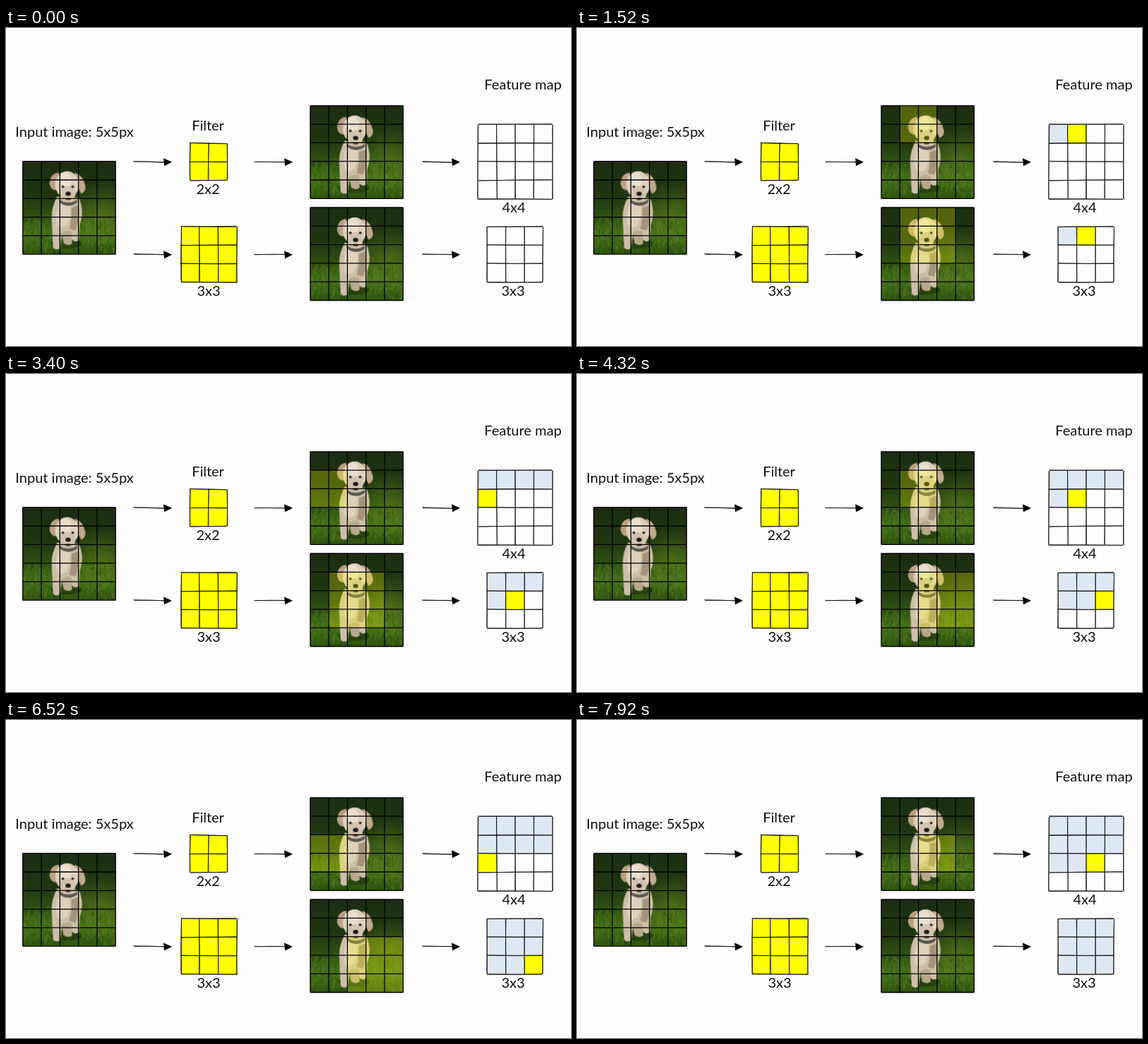
An HTML page with a canvas that plays this animation: 800x450 px, repeating every 8000 ms.

```html
<!DOCTYPE html>
<html lang="en">
<head>
<meta charset="utf-8">
<title>Filter size and feature map</title>
<style>
  html, body { margin: 0; height: 100%; overflow: hidden; background: #fffeff; }
  canvas { display: block; }
</style>
</head>
<body>
<canvas id="stage" width="800" height="450"></canvas>
<script>
const LOOP = 8000, FIRST_STEP = 650, STEP = 2000 / 3;
const CELL = 26.3, PHOTO = 131.5;
const YELLOW = '#ffff00', BLUE = '#dee8f4', INK = '#111';
const ctx = document.getElementById('stage').getContext('2d');

let seed = 1;
const rand = () => (seed = seed * 16807 % 2147483647) / 2147483647;
const jitter = amount => (rand() * 2 - 1) * amount;

function shape(c, color, path) {
  c.fillStyle = color;
  c.fill(new Path2D(path));
}

function oval(c, color, x, y, rx, ry, angle = 0) {
  c.fillStyle = color;
  c.beginPath();
  c.ellipse(x, y, rx, ry, angle, 0, 7);
  c.fill();
}

// Simplified puppy on a lawn, painted once
function paintPhoto() {
  const canvas = document.createElement('canvas');
  canvas.width = canvas.height = 132;
  const c = canvas.getContext('2d');
  const lawn = c.createLinearGradient(0, 0, 0, 132);
  [[0, '#1b2f10'], [.35, '#1f3611'], [.6, '#2f5213'], [.78, '#467319'], [1, '#2f5412']]
    .forEach(([at, color]) => lawn.addColorStop(at, color));
  c.fillStyle = lawn;
  c.fillRect(0, 0, 132, 132);
  const glow = c.createRadialGradient(112, 76, 4, 112, 76, 50);
  glow.addColorStop(0, 'rgba(110,140,35,.45)');
  glow.addColorStop(1, 'rgba(110,140,35,0)');
  c.fillStyle = glow;
  c.fillRect(0, 0, 132, 132);

  seed = 11;
  for (let i = 0; i < 260; i++) {
    const x = rand() * 132, y = 80 + rand() * 52;
    c.strokeStyle = rand() < .5 ? 'rgba(125,165,50,.35)' : 'rgba(22,48,8,.4)';
    c.beginPath();
    c.moveTo(x, y);
    c.lineTo(x + jitter(3), y - 3 - rand() * 5);
    c.stroke();
  }

  oval(c, 'rgba(20,40,8,.5)', 62, 117, 22, 7);
  shape(c, '#b8a88d', 'M54 95 L70 95 70 117 Q64 121 58 116Z');
  shape(c, '#cdbea6', 'M49 50 Q41 64 41 80 L43 121 Q44 127 53 124 L56 101 Q63 96 69 100 L70 111 Q74 116 80 112 L81 90 Q88 72 80 52Z');
  shape(c, '#ded0ba', 'M52 57 Q45 74 49 92 Q56 97 63 90 Q69 76 67 60Z');
  shape(c, '#a49379', 'M69 66 Q70 82 66 96 L75 98 Q82 82 79 62Z');
  shape(c, '#5a5650', 'M52 54 Q64 63 78 54 L77 59 Q65 67 53 59Z');
  shape(c, '#baa184', 'M51 16 Q39 17 38 32 Q40 41 47 41 L52 26Z');
  shape(c, '#c2a98a', 'M74 16 Q86 20 89 35 Q90 43 83 46 L76 32Z');
  oval(c, '#ddd0bb', 63, 33, 17, 19);
  oval(c, '#e9dfcf', 60, 27, 9, 11);
  oval(c, '#d2c3ac', 64, 46, 11, 11);
  oval(c, '#25201b', 57, 36, 2, 1.8);
  oval(c, '#25201b', 71, 36, 2, 1.8);
  oval(c, '#1d1a18', 64.5, 46, 3.8, 3);
  oval(c, '#54463c', 64.5, 53.5, 4, 1.8);
  return canvas;
}
const photo = paintPhoto();

function roughLine(x1, y1, x2, y2) {
  ctx.strokeStyle = INK;
  ctx.lineWidth = .85;
  for (let pass = 0; pass < 2; pass++) {
    ctx.beginPath();
    ctx.moveTo(x1 + jitter(.8), y1 + jitter(.8));
    ctx.quadraticCurveTo((x1 + x2) / 2 + jitter(.8), (y1 + y2) / 2 + jitter(.8),
      x2 + jitter(.8), y2 + jitter(.8));
    ctx.stroke();
  }
}

function grid(x, y, n) {
  const size = n * CELL;
  for (let i = 0; i <= n; i++) {
    roughLine(x, y + i * CELL, x + size, y + i * CELL);
    roughLine(x + i * CELL, y, x + i * CELL, y + size);
  }
}

function filterGrid(x, y, n) {
  ctx.fillStyle = YELLOW;
  ctx.fillRect(x, y, n * CELL, n * CELL);
  grid(x, y, n);
}

// n is the feature map side; the window covers 6 - n cells
function picture(x, y, n, step = -1) {
  ctx.drawImage(photo, x, y, PHOTO, PHOTO);
  if (step >= 0 && step < n * n) {
    const side = (6 - n) * CELL;
    ctx.fillStyle = 'rgba(255,255,0,.25)';
    ctx.fillRect(x + step % n * CELL, y + Math.floor(step / n) * CELL, side, side);
  }
  ctx.strokeStyle = '#000';
  ctx.lineWidth = 1.3;
  ctx.beginPath();
  for (let i = 0; i <= 5; i++) {
    const d = i * CELL;
    ctx.moveTo(x, y + d);
    ctx.lineTo(x + PHOTO, y + d);
    ctx.moveTo(x + d, y);
    ctx.lineTo(x + d, y + PHOTO);
  }
  ctx.stroke();
}

function featureMap(x, y, n, step) {
  for (let i = 0; i <= Math.min(step, n * n - 1); i++) {
    ctx.fillStyle = i === step ? YELLOW : BLUE;
    ctx.fillRect(x + i % n * CELL, y + Math.floor(i / n) * CELL, CELL, CELL);
  }
  grid(x, y, n);
}

function arrow(x, y) {
  roughLine(x, y, x + 46, y + .8);
  shape(ctx, '#000', `M${x + 54} ${y + .8} l-12 -5.5 l1 11Z`);
}

function label(text, x, y) {
  ctx.fillStyle = INK;
  ctx.fillText(text, x, y);
}

function draw(now) {
  const step = Math.floor((now % LOOP - FIRST_STEP) / STEP);
  seed = 77;
  ctx.fillStyle = '#fffeff';
  ctx.fillRect(0, 0, 800, 450);

  picture(23.7, 188.7, 4);
  filterGrid(260.5, 163, 2);
  filterGrid(247.8, 281, 3);
  picture(430.8, 109.8, 4, step);
  picture(430.8, 254, 3, step);
  featureMap(668.3, 136.5, 4, step);
  featureMap(681, 281, 3, step);
  for (const y of [189, 320]) [181, 352, 589].forEach(x => arrow(x, y));

  ctx.font = '20px Lato, sans-serif';
  ctx.textAlign = 'center';
  label('Input image: 5x5px', 97, 154);
  label('Filter', 286, 145);
  label('Feature map', 732, 87);
  label('2x2', 286, 235);
  label('3x3', 287, 379);
  label('4x4', 719, 261);
  label('3x3', 718, 379);
  requestAnimationFrame(draw);
}
requestAnimationFrame(draw);
</script>
</body>
</html>
```
